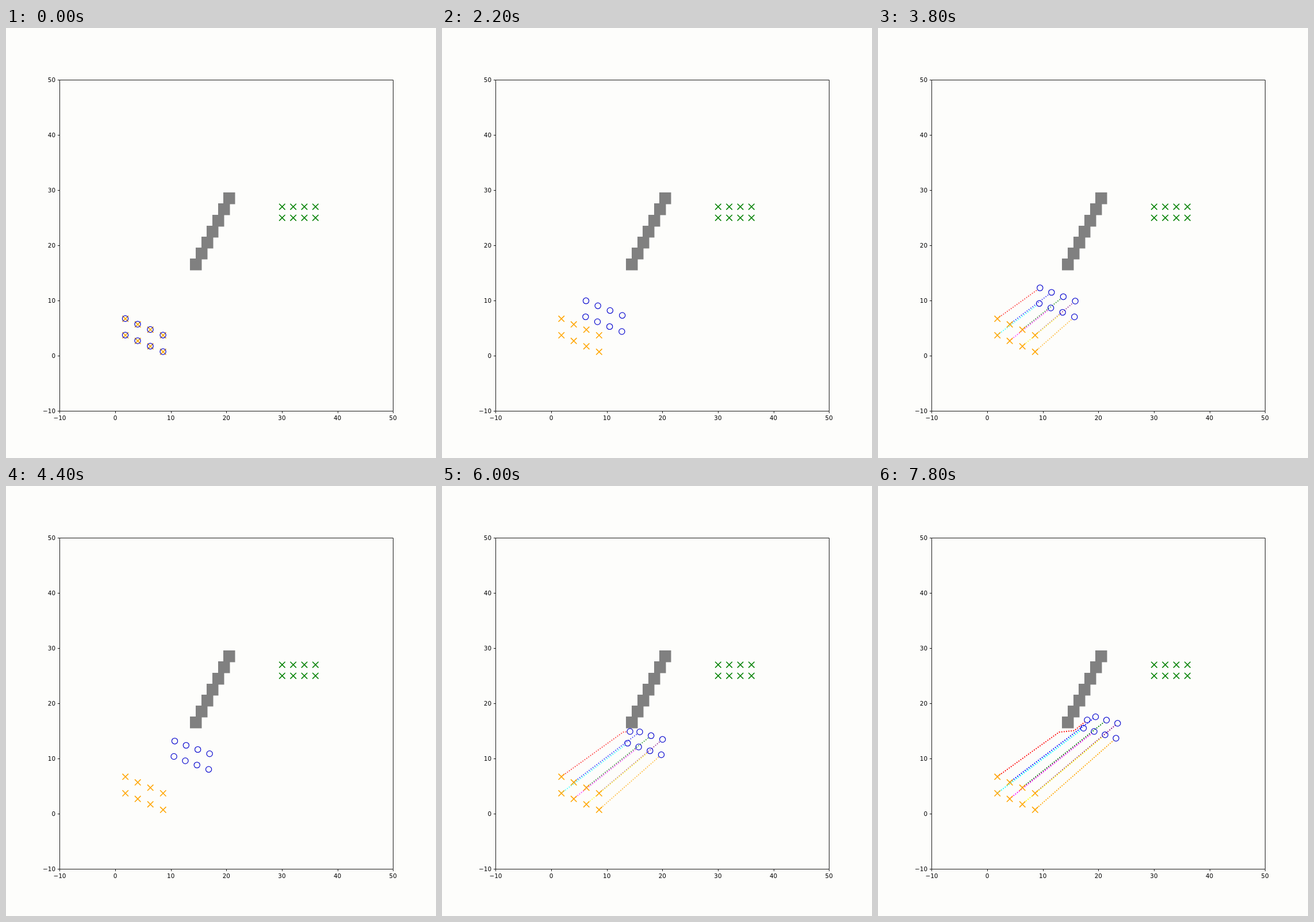
An HTML page that plays this animation: 748x748 px, repeating every 8 s.

```html
<!DOCTYPE html>
<html lang="en">
<head>
<meta charset="utf-8">
<title>Robots passing an obstacle</title>
<style>
  html, body { margin: 0; width: 100%; height: 100%; overflow: hidden; background: #fdfdfb; }
  svg { display: block; width: 100%; height: 100%; }
  text { font: 10.4px "DejaVu Sans", sans-serif; fill: #000; }
  .axes { fill: none; stroke: #000; stroke-width: .9; }
  .walls { fill: #808080; }
  .cross { fill: none; stroke-width: 1.56; }
  .trail { fill: none; stroke-width: 1.9; stroke-dasharray: 1.8 2.33; }
  .robot { fill: none; stroke: #1010d0; stroke-width: 1.25; }
</style>
</head>
<body>
<svg viewBox="0 0 748 748">
  <g id="axes"></g>
  <g id="walls" class="walls"></g>
  <g id="trails"></g>
  <g id="crosses"></g>
  <g id="robots"></g>
</svg>
<script>
const STEP_MS = 200, STEPS = 40, LAST = STEPS - 1;
const LEFT = 93.5, RIGHT = 673.2, TOP = 89.8, BOTTOM = 665.7;
const px = x => LEFT + (x + 10) * (RIGHT - LEFT) / 60;
const py = y => BOTTOM - (y + 10) * (BOTTOM - TOP) / 60;
// Centre of the pixel that a thin line falls on.
const snap = v => Math.ceil(v - .5) + .5;

// Each path is a list of [step, x, y] waypoints in pixels.
const robots = [
  { color: 'red', path: [[0, 207.5, 505.5], [27.5, 315, 428.2], [33, 341.5, 425.5], [LAST, 364, 407]] },
  { color: 'blue', path: [[0, 229, 515.3], [LAST, 378.5, 401.5]] },
  { color: 'green', path: [[0, 251, 524.5], [LAST, 397.5, 407.3]] },
  { color: 'purple', path: [[0, 273.1, 534.2], [LAST, 416.8, 412.8]] },
  { color: 'cyan', path: [[0, 207.5, 534.2], [LAST, 357.5, 421.3]] },
  { color: 'magenta', path: [[0, 229, 544], [LAST, 376, 427]] },
  { color: 'yellow', path: [[0, 251, 553.4], [LAST, 395, 432.8]] },
  { color: 'orange', path: [[0, 273.1, 563], [LAST, 414, 438.8]] }
];

const byId = id => document.getElementById(id);

function add(parent, tag, attrs, text = '') {
  const node = document.createElementNS('http://www.w3.org/2000/svg', tag);
  for (const key in attrs) node.setAttribute(key, attrs[key]);
  node.textContent = text;
  return byId(parent).appendChild(node);
}

function cross(x, y, color) {
  const r = 5.2;
  add('crosses', 'path', {
    class: 'cross', stroke: color,
    d: `M${x - r} ${y - r}l${2 * r} ${2 * r}m0 ${-2 * r}l${-2 * r} ${2 * r}`
  });
}

function drawAxes() {
  const [left, right, top, bottom] = [LEFT, RIGHT, TOP, BOTTOM].map(snap);
  let d = `M${left} ${top}H${right}V${bottom}H${left}Z`;
  for (let v = -10; v <= 50; v += 10) {
    const label = String(v).replace('-', '\u2212');
    d += `M${snap(px(v))} ${bottom}v3.6M${left} ${snap(py(v))}h-3.6`;
    add('axes', 'text', { x: px(v), y: 681.5, 'text-anchor': 'middle' }, label);
    add('axes', 'text', { x: 86, y: py(v) + 4.2, 'text-anchor': 'end' }, label);
  }
  add('axes', 'path', { class: 'axes', d });
}

function position(path, step) {
  const i = Math.max(1, path.findIndex(p => p[0] >= step));
  const [s0, x0, y0] = path[i - 1], [s1, x1, y1] = path[i];
  const k = (step - s0) / (s1 - s0);
  return [x0 + (x1 - x0) * k, y0 + (y1 - y0) * k];
}

// The trails flicker a little slower than every second step.
function trailOpacity(step) {
  const phase = step * 5 % 11;
  return phase < 6 ? 0 : phase === 8 ? 1 : .7;
}

function render(step) {
  const trailEnd = Math.max(0, step - 1);
  byId('trails').setAttribute('opacity', trailOpacity(step));
  for (const { path, trail, ring } of robots) {
    const [x, y] = position(path, step);
    const passed = path.filter(p => p[0] < trailEnd).map(p => p.slice(1));
    ring.setAttribute('cx', x);
    ring.setAttribute('cy', y);
    trail.setAttribute('points', [...passed, position(path, trailEnd)].join(' '));
  }
}

drawAxes();
for (let i = 0; i < 7; i++) {
  const x = Math.round(px(14.5 + i) - 10), y = Math.round(py(16.5 + 2 * i) - 10);
  add('walls', 'rect', { x, y, width: 20.5, height: 20.5 });
}
for (let i = 0; i < 8; i++) {
  cross(px(30 + 2 * (i % 4)) + .4, py(i < 4 ? 27 : 25) + .4, 'green');
}
for (const robot of robots) {
  const [, x, y] = robot.path[0];
  cross(x + .2, y + .3, 'orange');
  robot.trail = add('trails', 'polyline', { class: 'trail', stroke: robot.color });
  robot.ring = add('robots', 'circle', { class: 'robot', r: 5.1 });
}

let shown = -1;
function tick() {
  const step = Math.floor(performance.now() / STEP_MS) % STEPS;
  if (step !== shown) render(shown = step);
  requestAnimationFrame(tick);
}
tick();
</script>
</body>
</html>
```
